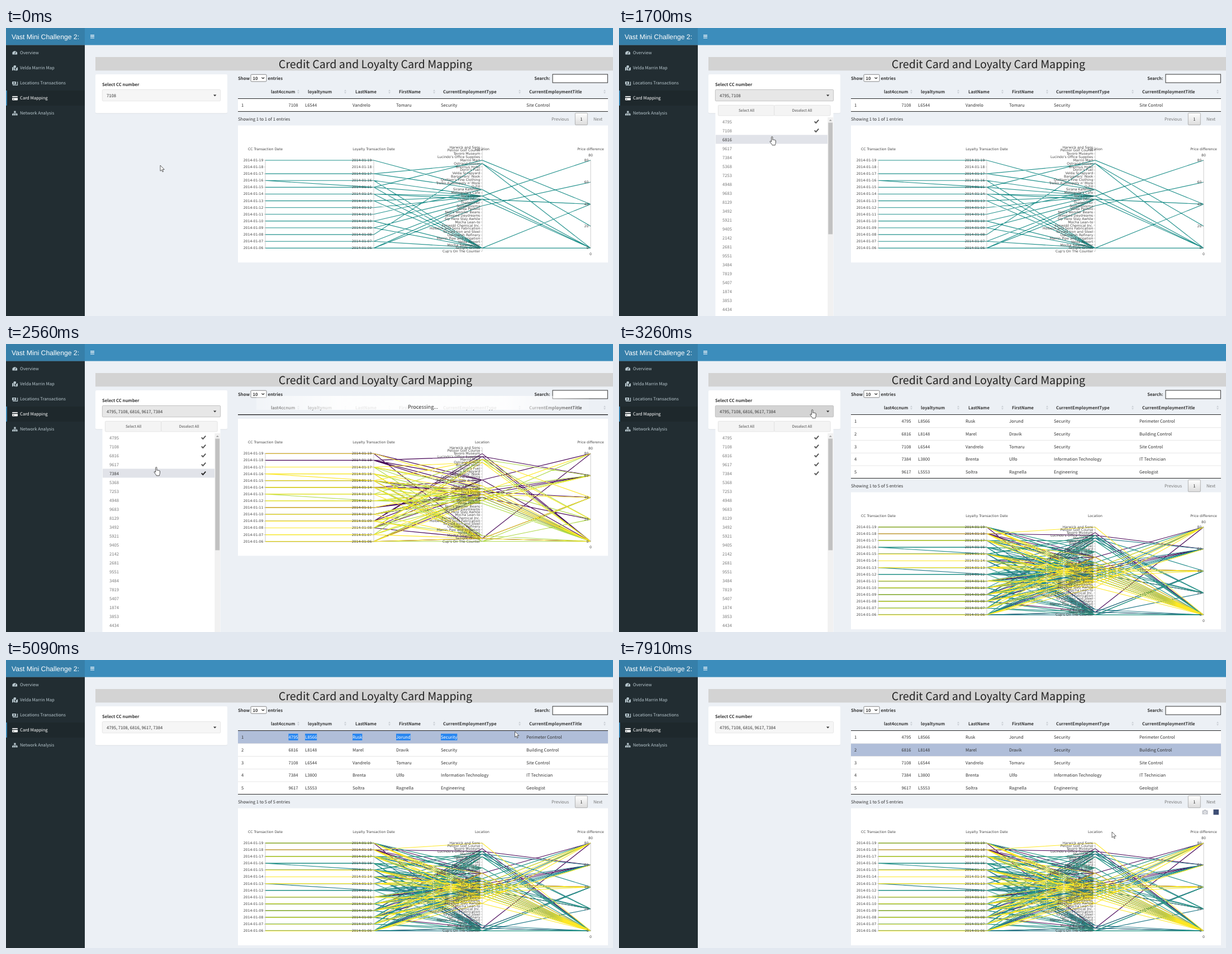
An HTML page for the animation above (8000 ms loop, 1086x516 px).

```html
<!DOCTYPE html>
<html lang="en">
<head>
<meta charset="utf-8">
<title>Card Mapping</title>
<style>
html, body { margin: 0; height: 100%; overflow: hidden; background: #ecf0f5; }
svg { display: block; }
text { font: 7.67px 'Noto Sans CJK SC', 'Noto Sans CJK JP', 'Noto Sans CJK', sans-serif; fill: #333; text-rendering: geometricPrecision; }
.bold { font-weight: bold; }
.logo { font: 12.2px 'Liberation Sans', Arial, sans-serif; fill: #fff; }
.title { font-size: 19.7px; fill: #222; }
.menu { fill: #b8c7ce; }
.active { fill: #fff; }
.muted { fill: #777; }
.small { font-size: 6.6px; fill: #444; }
.busy { font-size: 9.2px; }
.chart text { font: 6.13px 'DejaVu Sans', Verdana, sans-serif; fill: #444; }
</style>
</head>
<body>
<svg width="1086" height="516" viewBox="0 0 1086 516">
  <defs>
    <linearGradient id="veil">
      <stop offset="0" stop-color="#fff" stop-opacity=".3"/>
      <stop offset=".25" stop-color="#fff" stop-opacity=".9"/>
      <stop offset=".75" stop-color="#fff" stop-opacity=".9"/>
      <stop offset="1" stop-color="#fff" stop-opacity=".1"/>
    </linearGradient>
    <linearGradient id="raised" x2="0" y2="1">
      <stop offset="0" stop-color="#fff"/><stop offset="1" stop-color="#dcdcdc"/>
    </linearGradient>
  </defs>
  <g id="page"></g>
  <g id="live"></g>
</svg>
<script>
const LOOP = 8000;
const page = document.getElementById('page'), live = document.getElementById('live');

const text = (x, y, s, cls = '', anchor = 'start', extra = '') =>
  `<text x="${x}" y="${y}" class="${cls}" text-anchor="${anchor}" ${extra}>${s}</text>`;
const rect = (x, y, w, h, fill, extra = '') =>
  `<rect x="${x}" y="${y}" width="${w}" height="${h}" fill="${fill}" ${extra}/>`;
const path = (d, stroke, width = 1, fill = 'none') =>
  `<path d="${d}" stroke="${stroke}" stroke-width="${width}" fill="${fill}"/>`;
const outline = color => `stroke="${color}" stroke-width=".7" rx="1.5"`;

// ---------- data ----------
const people = {
  4795: ['L8566', 'Rusk', 'Jorund', 'Security', 'Perimeter Control'],
  6816: ['L8148', 'Marel', 'Dravik', 'Security', 'Building Control'],
  7108: ['L6544', 'Vandrelo', 'Tomaru', 'Security', 'Site Control'],
  7384: ['L3800', 'Brenta', 'Ulfo', 'Information Technology', 'IT Technician'],
  9617: ['L5553', 'Soltra', 'Ragnella', 'Engineering', 'Geologist']
};
const cardList = ('4795 7108 6816 9617 7384 5368 7253 4948 9683 8129 3492 5921 9405 ' +
  '2142 2681 9551 3484 7819 5407 1874 3853 4434').split(' ');
const places = ['Harwick and Sons', 'Pelinor Golf Course', 'Tavoro Museum', "Lucindo's Office Supplies",
  'Marrin Mart', 'Ostrand Grocer', 'Brelmus Hotel', "Dorin's Fuel", 'Velda Scrapyard', "Bargainers' Nook",
  "Quillam's Fine Clothing", "Trelko Autosupply n' More", 'Q-Fill', 'Sirana Kafenion', "Melisanda's Cafe",
  "Tov's Gyros", 'Ouzeri Dorva', 'Thalassinor', 'Sorbettissima', 'Velda Pastelo', "Nell's Wonder Beans",
  'Steeped Daydreams', 'Sip Here Stay Awhile', 'Mocha Lean-to', 'Fenwold Chemical Inc.',
  'Holbeck and Sons Fabrication', 'Torvald Iron and Steel', 'Oakmarsh Refinery', 'Marrin Pipe and Irrigation',
  'Velda Airport', 'Mocha Salamander', 'Twilight Grinds', "Cup's On The Counter"];

function seeded(seed) {
  return () => {
    seed = seed + 0x6D2B79F5 | 0;
    let r = Math.imul(seed ^ seed >>> 15, 1 | seed);
    r = r + Math.imul(r ^ r >>> 7, 61 | r) ^ r;
    return ((r ^ r >>> 14) >>> 0) / 4294967296;
  };
}

// A purchase is [loyalty day, place, price difference, card day if it differs].
function purchases(seed, spots, skippedDays, extra) {
  const random = seeded(seed), list = [...extra];
  for (let day = 19; day >= 6; day--) {
    if (skippedDays.includes(day)) continue;
    for (let i = 0; i < 3; i++) {
      const spot = spots[Math.floor(random() * spots.length)];
      list.push([day, spot, random() < .8 ? 0 : 20 * Math.ceil(random() * 4)]);
    }
  }
  return list;
}
const trips = {
  4795: purchases(4, [3, 11, 14, 15, 16, 17, 31], [17, 16, 13, 12, 7], [[9, 2, 0], [18, 11, 0], [6, 31, 80], [11, 16, 60]]),
  6816: purchases(9, [4, 14, 15, 16, 17, 18, 19, 30, 32], [19, 18, 11], [[12, 19, 0, 13], [6, 32, 20], [8, 4, 60]]),
  7108: [[19, 13, 0], [17, 5, 20], [17, 13, 0], [16, 15, 0], [16, 31, 0], [15, 4, 40], [15, 31, 0, 16],
    [15, 15, 0], [14, 15, 80], [14, 16, 40], [14, 31, 0], [13, 15, 0], [13, 31, 40], [12, 15, 0],
    [11, 13, 0], [10, 15, 0], [10, 31, 0], [9, 16, 0], [9, 31, 0], [8, 5, 0], [7, 16, 0], [7, 31, 0],
    [6, 31, 0], [6, 16, 0], [6, 18, 60]],
  7384: purchases(21, [3, 5, 9, 13, 15, 17, 19, 32], [18, 13], [[17, 5, 20], [10, 32, 40]]),
  9617: purchases(33, [11, 13, 14, 15, 16, 17, 18, 19, 20, 22], [16, 12], [[18, 0, 0], [7, 17, 80], [9, 15, 40]])
};

// ---------- static page ----------
function drawPage() {
  const icons = [
    path('M11.5 47.5A4.6 4.6 0 1 1 20 47.5Z', 'none', 0, '#b8c7ce') + path('M15.7 46.5L17.5 42.5', '#222d32'),
    path('M11 70.5l2.5-1v6l-2.5 1zM14.2 71.5l3 3v2l-3-1zM18 72l3-2v5.5l-3 1.2zM15.8 73c-4-4.6-2-6 0-6s4 1.4 0 6', 'none', 0, '#b8c7ce'),
    rect(11, 96, 7, 5, '#b8c7ce') + path('M12 102.3h8.5v-6', '#b8c7ce', 1.3) + `<circle cx="14.5" cy="98.5" r="1.2" fill="#222d32"/>`,
    rect(11, 122, 10, 7.5, '#fff', 'rx="1"') + rect(11, 123.7, 10, 1.6, '#1e282c') + rect(12.3, 127, 2.5, .8, '#1e282c'),
    rect(14.3, 148.7, 3.2, 3, '#b8c7ce') + path('M12.5 154v-1h7v1M16 151v3', '#b8c7ce', .8) +
      [11, 14.4, 17.8].map(x => rect(x, 153.8, 2.8, 2.8, '#b8c7ce')).join('')
  ];
  const menu = ['Overview', 'Velda Marrin Map', 'Locations Transactions', 'Card Mapping', 'Network Analysis'];
  const headings = [[474, 'last4ccnum', 523], [540, 'loyaltynum', 607], [625, 'LastName', 686],
    [703, 'FirstName', 766], [782, 'CurrentEmploymentType', 919], [936, 'CurrentEmploymentTitle', 1071]];
  page.innerHTML =
    rect(0, 0, 1086, 516, '#ecf0f5') + rect(0, 0, 1086, 30.6, '#3c8dbc') + rect(0, 0, 141, 30.6, '#367fa9') +
    text(10, 19.5, 'Vast Mini Challenge 2:', 'logo') + path('M151 12.8h7M151 15.4h7M151 18h7', '#fff', 1.2) +
    rect(0, 30.6, 141, 486, '#222d32') + rect(0, 112, 141, 27, '#1e282c') + rect(0, 112, 1.8, 27, '#3c8dbc') +
    menu.map((s, i) => text(25, 47.4 + 27 * i, s, i === 3 ? 'active' : 'menu')).join('') + icons.join('') +
    rect(160, 52, 926, 24.3, '#d3d3d3') + text(661, 71.8, 'Credit Card and Loyalty Card Mapping', 'title', 'middle') +
    rect(160, 83.5, 236, 70, '#dde1e5', 'rx="2"') + rect(160, 83, 236, 69.5, '#fff', 'rx="2"') +
    text(172, 104, 'Select CC number', 'bold') +
    text(415, 92.5, 'Show', 'bold') + rect(438, 83.3, 28, 12.6, '#fff', outline('#555')) + text(441.5, 92.5, '10', 'bold') +
    path('M457.5 88.5l2.3 2.3 2.3-2.3', '#222', 1.1) + text(468.5, 92.5, 'entries', 'bold') +
    text(973.5, 93.3, 'Search:', 'bold', 'end') + rect(978, 83, 98.4, 15, '#fff', 'stroke="#333"') +
    headings.map(([x, s, sort]) => text(x, 117, s, 'bold') +
      path(`M${sort - 2} 113.2l2-3 2 3zM${sort - 2} 114.8l2 3 2-3z`, 'none', 0, '#cbd0d6')).join('');
}

// ---------- parallel coordinates ----------
const viridis = [[68, 1, 84], [59, 82, 139], [33, 145, 140], [94, 201, 98], [253, 231, 37]];
function shade(f) {
  const i = Math.min(3, Math.floor(f * 4)), u = f * 4 - i;
  return `rgb(${viridis[i].map((c, k) => Math.round(c + (viridis[i + 1][k] - c) * u))})`;
}
const charts = {};
function chart(cards) {
  const key = cards.join();
  if (charts[key]) return charts[key];
  const axisX = [464, 658, 852, 1046], used = cards.flatMap(c => trips[c].map(p => p[1]));
  const low = Math.min(...used), high = Math.max(...used), top = 62.3, span = 157.4;
  const dayY = d => top + span * (19 - d) / 13;
  const placeY = i => top + span * (i - low) / (high - low);
  const priceY = p => top + span * (1 - p / 80);
  const first = cards[0], range = cards[cards.length - 1] - first;
  let out = rect(415, 0, 662, 245.5, '#fff');
  for (const card of cards) {
    const d = trips[card].map(([day, place, price, cardDay = day]) =>
      `M464 ${dayY(cardDay)}L658 ${dayY(day)} 852 ${placeY(place)} 1046 ${priceY(price)}`).join('');
    out += path(d, shade(range ? (card - first) / range : .5), 1.1);
  }
  const axis = (x, ys, labels) =>
    path(`M${x} ${ys[0]}V${ys[ys.length - 1]}` + ys.map(y => `M${x - 2.5} ${y}h2.5`).join(''), '#aaa', .6) +
    ys.map((y, i) => text(x - 3.7, y + 2, labels[i], '', 'end')).join('');
  const days = Array.from({ length: 14 }, (_, i) => 19 - i), prices = [80, 60, 40, 20, 0];
  const dates = days.map(d => '2014-01-' + String(d).padStart(2, '0'));
  out += axis(464, days.map(dayY), dates) + axis(658, days.map(dayY), dates) +
    axis(852, places.map((_, i) => placeY(i)), places) + axis(1046, prices.map(priceY), prices) +
    ['CC Transaction Date', 'Loyalty Transaction Date', 'Location', 'Price difference']
      .map((s, i) => text(axisX[i], 44, s, '', 'middle')).join('') +
    text(1046, 55, 80, '', 'middle') + text(1046, 232, 0, '', 'middle');
  return charts[key] = out;
}

// ---------- pointer: start, end, steps, from x y, to x y, shape ----------
const moves = [
  [0, 0, 1, 276, 246, 276, 246, 'arrow'],
  [150, 285, 2, 279, 206, 282, 160, 'arrow'],
  [420, 420, 1, 283, 125, 283, 125, 'hand'],
  [710, 1130, 4, 283, 126, 279, 163, 'hand'],
  [1440, 1700, 3, 278, 166, 273.5, 194.5, 'hand'],
  [1840, 2270, 4, 273, 196, 270, 212, 'hand'],
  [2560, 2690, 2, 268.5, 220.5, 268.5, 220.5, 'hand'],
  [2830, 3260, 4, 285, 195, 345.5, 117.5, 'hand'],
  [3920, 4190, 3, 384, 126, 425, 140, 'arrow'],
  [4330, 4940, 6, 430, 138, 900, 134, 'beam'],
  [5090, 5640, 5, 910.5, 128, 850, 150, 'arrow'],
  [5780, 6050, 3, 815, 154, 788, 160, 'beam'],
  [6190, 6720, 5, 788, 162, 788, 180, 'beam'],
  [7120, 7250, 2, 788, 179, 788, 181, 'beam'],
  [7520, 7910, 4, 815, 215, 882, 308, 'arrow']
];
function pointerAt(t) {
  const [t0, t1, n, x0, y0, x1, y1, shape] = moves.filter(m => m[0] <= t).pop();
  const u = n > 1 ? Math.min(n - 1, Math.floor((t - t0) / (t1 - t0) * (n - 1) + .001)) / (n - 1) : 0;
  return { x: x0 + (x1 - x0) * u, y: y0 + (y1 - y0) * u, shape };
}
const shapes = {
  arrow: path('M0 0V10.3L2.4 8.1 4 11.8 5.6 11.1 4 7.5H7.3Z', '#222', .7, '#fff'),
  hand: `<g transform="translate(-3.8)">${path('M3 1.2c0-1.5 2.2-1.5 2.2 0V6c.3-.8 1.8-.7 2 .2.4-.7 1.7-.5 1.9.4.5-.5 1.6-.2 1.6.8v3.4c0 1.5-.9 2.4-1 4.6H4.4C4 13.5 2 12 .6 9.5c-.7-1.2.6-2 1.5-1.1L3 9.3Z', '#222', .8, '#fff')}</g>`,
  beam: path('M-2.8 .4h2L0 1 .8 .4h2M0 1V8.4M-2.8 9h2L0 8.4 .8 9h2', '#333', .8)
};

// ---------- changing parts ----------
const pen = document.createElement('canvas').getContext('2d');
pen.font = "7.67px 'Noto Sans CJK SC', 'Noto Sans CJK JP', 'Noto Sans CJK', sans-serif";
const columns = [522.5, 535, 620, 698, 778, 931];

function table(cards, t, pointer) {
  const bottom = 127 + 22.75 * cards.length;
  const picked = t >= 5780 ? 1 : t >= 4580 && t < 5640 ? 0 : -1;
  const marking = t >= 4330 && t < 5640;
  let out = '';
  cards.forEach((card, row) => {
    const y = 127 + 22.75 * row, hovered = t > 3920 && pointer.x > 415 && pointer.y >= y && pointer.y < y + 22.75;
    out += rect(415, y, 662, 22.75, row === picked ? '#b0bed9' : hovered ? '#f5f5f5' : '#fff');
    if (row) out += path(`M415 ${y}h662`, '#ddd', .7);
    out += text(421, y + 14.2, row + 1);
    [card, ...people[card]].forEach((s, i) => {
      const width = pen.measureText(s).width, left = i ? columns[i] : columns[0] - width;
      const marked = marking && row === 0 && left < pointer.x;
      if (marked) out += rect(left, y + 5, width, 12, '#2a87f0');
      out += text(columns[i], y + 14.2, s, marked ? 'active' : '', i ? 'start' : 'end');
    });
  });
  out += path(`M415 126.5h662M415 ${bottom - .2}h662`, '#111', .9);
  if (!cards.length) return out;
  return out + text(415, bottom + 15.8, `Showing 1 to ${cards.length} of ${cards.length} entries`) +
    text(976, bottom + 16.2, 'Previous', 'muted') + text(1051, bottom + 16.2, 'Next', 'muted') +
    rect(1018.3, bottom + 2.5, 22, 21.5, 'url(#raised)', outline('#979797')) +
    text(1029.3, bottom + 16.2, 1, '', 'middle');
}

function picker(t, pointer) {
  const open = t >= 710 && t < 3400;
  const count = t < 1440 ? 1 : t < 1840 ? 2 : t < 2270 ? 3 : t < 2560 ? 4 : 5;
  const checked = count === 1 ? ['7108'] : cardList.slice(0, count);
  const over = pointer.x < 384 && pointer.y > 110 && pointer.y < 131;
  const fill = open && over && t > 2830 ? '#d4d4d4' : open || over ? '#e7e7e7' : '#f6f6f6';
  let out = rect(172.3, 110.4, 211.4, 20.4, fill, outline(open || over ? '#adadad' : '#ddd')) +
    text(180, 123.8, checked.join(', ')) + path('M371 119.5h5.4l-2.7 2.9z', 'none', 0, '#333');
  if (!open) return out;
  out += rect(172.5, 132, 211, 384, '#fff') +
    rect(177.4, 138.4, 100.4, 18.6, '#f4f4f4', outline('#ddd')) + rect(277.8, 138.4, 100.4, 18.6, '#f4f4f4', outline('#ddd')) +
    text(228, 150.2, 'Select All', 'small', 'middle') + text(327.6, 150.2, 'Deselect All', 'small', 'middle');
  const hot = Math.floor((pointer.y + 4 - 159.5) / 16);
  cardList.forEach((card, i) => {
    const y = 159.5 + 16 * i;
    if (i === hot) out += rect(173, y, 200.3, 16, '#e1e3e9');
    out += text(185, y + 11.2, card, i === hot ? '' : 'muted');
    if (checked.includes(card)) out += path(`M349.8 ${y + 8}l2.6 2.7 4.8-5.6`, i === hot ? '#222' : '#555', 1.9);
  });
  return out + rect(373.3, 160, 10, 356, '#f1f1f1') + rect(374.4, 169.5, 7.8, 200, '#c1c1c1') +
    path('M375.8 166.5h5l-2.5-2.6z', 'none', 0, '#999');
}

function scene(t) {
  const pointer = pointerAt(t), all = Object.keys(people);
  const busy = t >= 1980 && t < 2130 || t >= 2560 && t < 2830;
  const shown = t < 2130 ? ['7108'] : t < 2560 ? ['4795', '7108'] : t < 2830 ? all.slice(0, 3) : all;
  const rows = busy ? [] : shown;
  const top = busy ? 134 : 127 + 22.75 * rows.length + 24.9;
  let out = table(rows, t, pointer) + `<g class="chart" transform="translate(0 ${top})">${chart(shown)}</g>`;
  if (busy) out += rect(448, 93, 595, 25, 'url(#veil)') + text(746, 115.8, 'Processing...', 'busy', 'middle');
  if (pointer.x > 415 && pointer.y > top) {
    out += path('M1043.5 269.5h2.5l1-1.6h3l1 1.6h2.5v7h-10z', 'none', 0, '#c3c6cc') +
      `<circle cx="1048.5" cy="273" r="1.9" fill="#c3c6cc" stroke="#fff"/>` + rect(1063.5, 267.8, 9.5, 9.5, '#3f4f75');
  }
  return out + picker(t, pointer) + `<g transform="translate(${pointer.x} ${pointer.y})">${shapes[pointer.shape]}</g>`;
}

let last = '';
function frame() {
  const next = scene(performance.now() % LOOP);
  if (next !== last) live.innerHTML = last = next;
  requestAnimationFrame(frame);
}
drawPage();
frame();
</script>
</body>
</html>
```
